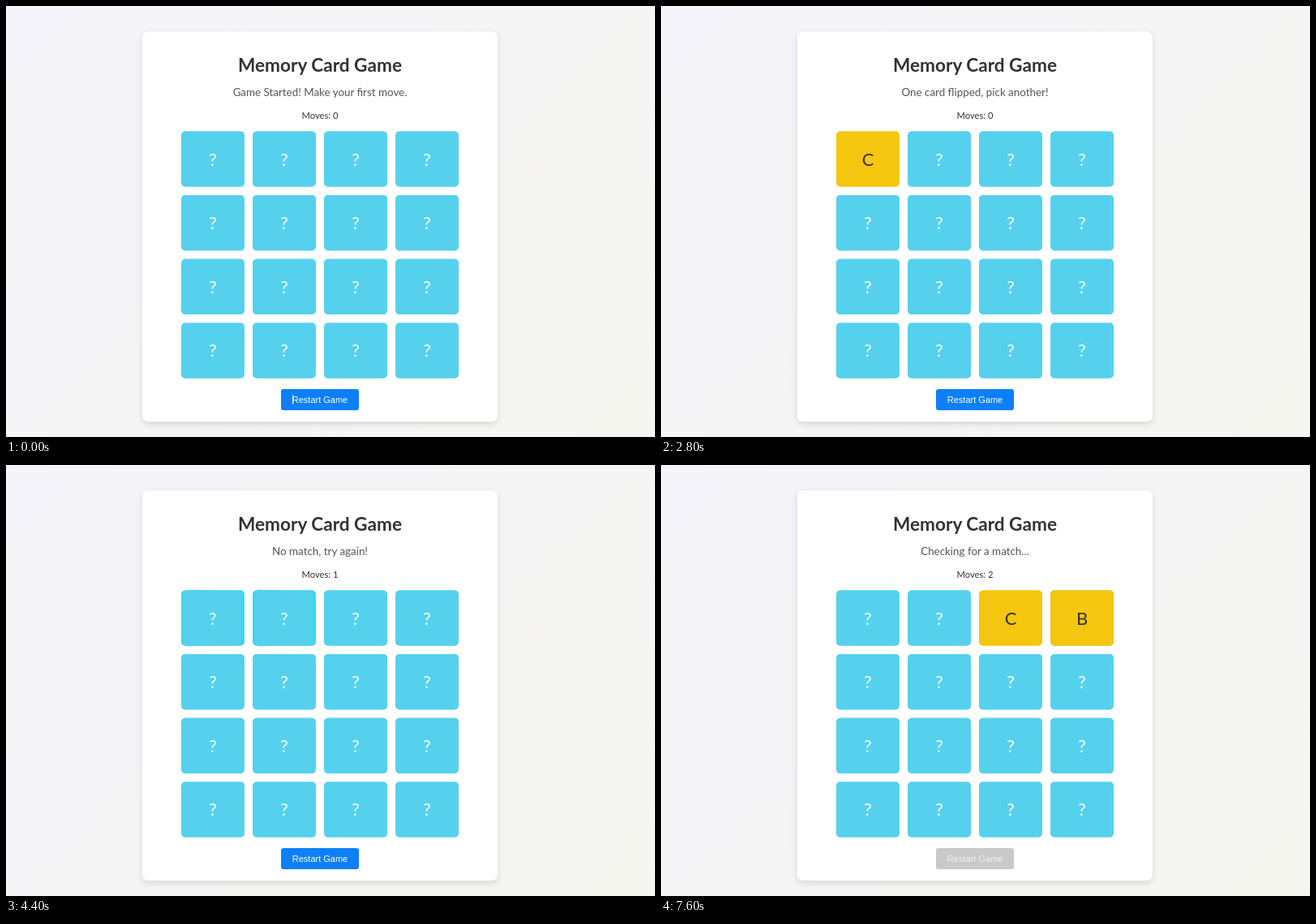
An HTML page that plays this animation: 800 by 531 pixels, repeating every 8000 ms.

```html
<!DOCTYPE html>
<html lang="en">
<head>
<meta charset="utf-8">
<title>Memory Card Game</title>
<style>
  html, body { margin: 0; width: 100%; height: 100%; overflow: hidden; }
  body { background: linear-gradient(135deg, #f5f4fa, #f5f5f0); }
  svg { display: block; position: absolute; left: 0; top: 0; }
  text { font-family: Lato, "Open Sans", sans-serif; text-anchor: middle; }
  .panel { fill: #fff; filter: drop-shadow(0 3px 4px rgba(0, 0, 0, .12)); }
  .title { font-size: 22.6px; font-weight: 700; fill: #333; }
  .message { font-size: 13.4px; fill: #555; }
  .moves { font-size: 11.2px; fill: #333; }
  .glyph { font-size: 22px; }
  .slot { fill: #3ad9eb; }
  .button { font: 11px "Liberation Sans", Arial, sans-serif; }
</style>
</head>
<body>
<svg id="stage" width="800" height="531" viewBox="0 0 800 531">
  <rect class="panel" x="168" y="31.5" width="438" height="480.5" rx="7"/>
  <text class="title" x="387" y="81">Memory Card Game</text>
  <text class="message" id="message" x="387" y="111"></text>
  <text class="moves" id="moves" x="387" y="139"></text>
  <g id="cards"></g>
  <rect id="button" x="339" y="472" width="96" height="26" rx="3"/>
  <text class="button" id="label" x="387" y="489">Restart Game</text>
  <rect id="caret" x="353" y="479" width="1" height="12" fill="#fff" opacity=".8"/>
</svg>
<script>
const LOOP = 8000, FLIP = 600, PERSPECTIVE = 1000;
const CARD = { w: 78, h: 68.5, r: 5 };
const FRONT = '#55d1ee', OPEN = '#f5c60f', CLOSING = '#e7ebea';
const BLUE = [13, 127, 248], GREY = [200, 201, 200];

const messages = [
  [0, 'Game Started! Make your first move.'],
  [1160, 'One card flipped, pick another!'],
  [2960, 'Checking for a match...'],
  [3990, 'No match, try again!'],
  [5960, 'One card flipped, pick another!'],
  [7010, 'Checking for a match...']
];
const moves = [[0, 0], [2960, 1], [7010, 2]];
const flips = [
  { letter: 'C', open: 1160, miss: 3990, close: 4060 },
  { letter: 'G', open: 2960, miss: 3990, close: 4060 },
  { letter: 'C', open: 5960 },
  { letter: 'B', open: 7010 }
];

const byId = id => document.getElementById(id);
const clamp = v => Math.min(1, Math.max(0, v));
const latest = (list, t) => list.filter(([start]) => start <= t).pop()[1];
const set = (node, attrs) => {
  for (const key in attrs) node.setAttribute(key, attrs[key]);
  return node;
};
const add = (parent, tag, attrs) => parent.appendChild(
  set(document.createElementNS('http://www.w3.org/2000/svg', tag), attrs));

// CSS "ease": cubic-bezier(.25, .1, .25, 1)
function ease(x) {
  if (x <= 0 || x >= 1) return clamp(x);
  const bezier = (a, b, s) => 3 * a * s * (1 - s) ** 2 + 3 * b * s * s * (1 - s) + s ** 3;
  let lo = 0, hi = 1;
  for (let i = 0; i < 24; i++) {
    const mid = (lo + hi) / 2;
    if (bezier(.25, .25, mid) < x) lo = mid; else hi = mid;
  }
  return bezier(.1, 1, lo);
}
const progress = (t, start, length) => ease(clamp((t - start) / length));

// Outline of a rounded card centred on the origin
const outline = [];
[[1, 1], [-1, 1], [-1, -1], [1, -1]].forEach(([sx, sy], corner) => {
  for (let i = 0; i <= 6; i++) {
    const a = (corner + i / 6) * Math.PI / 2;
    outline.push([
      sx * (CARD.w / 2 - CARD.r) + CARD.r * Math.cos(a),
      sy * (CARD.h / 2 - CARD.r) + CARD.r * Math.sin(a)
    ]);
  }
});

function turned(angle) {
  return outline.map(([x, y]) => {
    const depth = PERSPECTIVE / (PERSPECTIVE + x * Math.sin(angle));
    return [x * Math.cos(angle) * depth, y * depth].map(v => v.toFixed(2)).join();
  }).join(' ');
}

const cards = Array.from({ length: 16 }, (_, i) => {
  const x = 255 + 88 * (i % 4), y = 188.5 + 78.65 * Math.floor(i / 4);
  const group = add(byId('cards'), 'g', { transform: `translate(${x} ${y})` });
  const slot = add(group, 'polygon', { class: 'slot', points: turned(0) });
  const face = add(group, 'polygon', { points: turned(0), fill: FRONT });
  const glyph = add(group, 'text', { class: 'glyph', y: 8, fill: '#f4fdff' });
  glyph.textContent = '?';
  return { slot, face, glyph };
});

function drawCard({ slot, face, glyph }, flip, t) {
  let turn = progress(t, flip.open, FLIP);
  if (flip.close) turn -= progress(t, flip.close, FLIP);
  const back = turn > .5;
  const angle = (back ? turn - 1 : turn) * Math.PI;
  const color = !back ? FRONT : t >= flip.miss ? CLOSING : OPEN;
  set(slot, { visibility: angle ? 'visible' : 'hidden' });
  set(face, { points: turned(angle), fill: color });
  set(glyph, { transform: `scale(${Math.cos(angle)} 1)`, fill: back ? '#333' : '#f4fdff' });
  glyph.textContent = back ? flip.letter : '?';
}

function draw(t) {
  byId('message').textContent = latest(messages, t);
  byId('moves').textContent = 'Moves: ' + latest(moves, t);
  flips.forEach((flip, i) => drawCard(cards[i], flip, t));

  const disabled = progress(t, 2960, 300) - progress(t, 4060, 300) + progress(t, 7010, 300);
  const fill = BLUE.map((v, i) => Math.round(v + (GREY[i] - v) * disabled));
  set(byId('button'), { fill: `rgb(${fill})` });
  set(byId('label'), { fill: disabled > .5 ? '#f2f2f2' : '#fff' });
  set(byId('caret'), { visibility: (t + 800) % 1200 < 600 ? 'hidden' : 'visible' });
}

cards.forEach(({ slot }) => set(slot, { visibility: 'hidden' }));
const began = performance.now();
function tick() {
  draw((performance.now() - began) % LOOP);
  requestAnimationFrame(tick);
}
draw(0);
requestAnimationFrame(tick);
</script>
</body>
</html>
```
